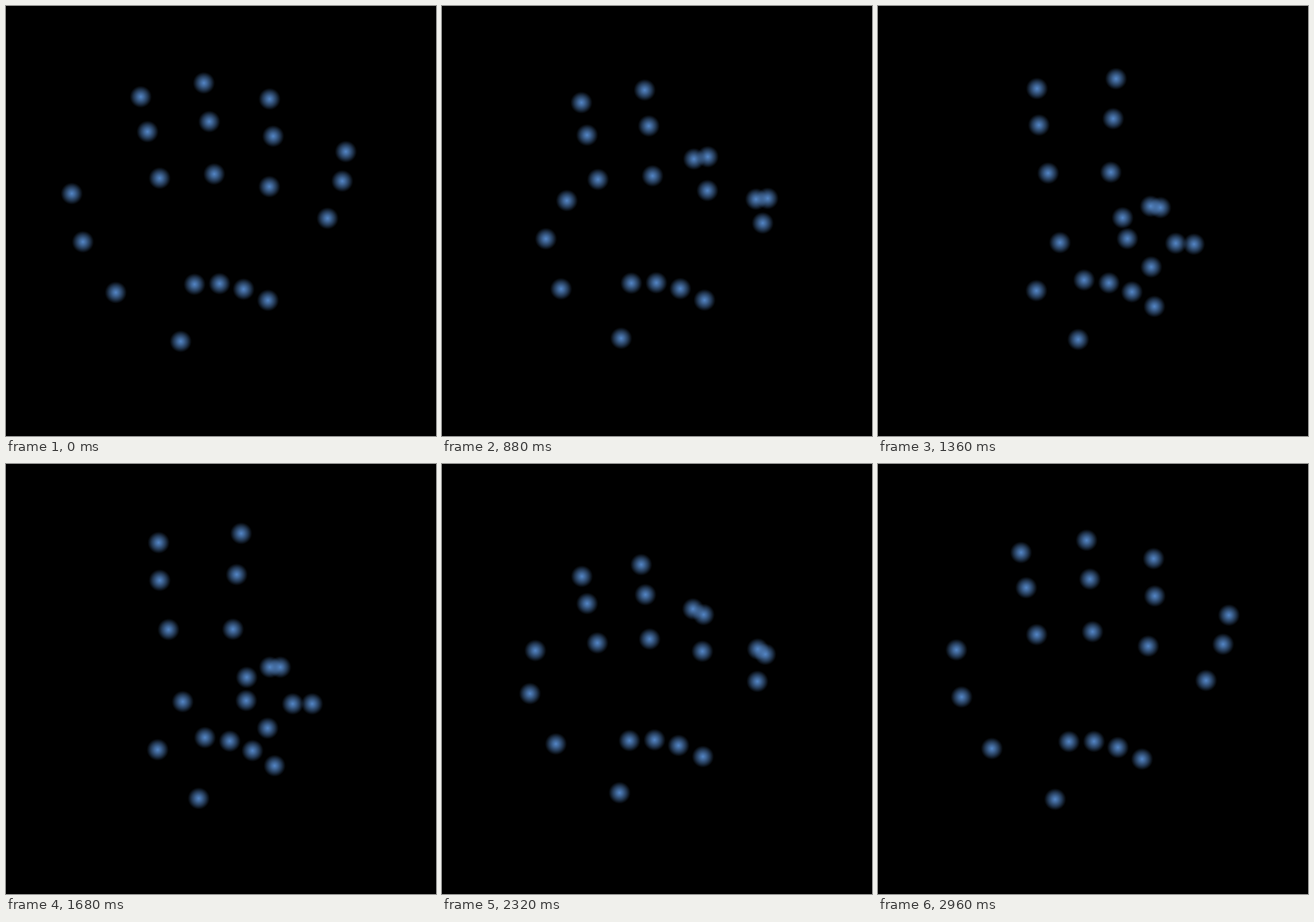
These frames come from a looping animation (618x618 px, 3.04 s). An HTML page with a canvas:

```html
<!DOCTYPE html>
<html lang="en">
<head>
<meta charset="utf-8">
<title>Hand of dots</title>
<style>
  html, body { margin: 0; width: 100%; height: 100%; overflow: hidden; background: #000; }
  canvas { display: block; width: 618px; height: 618px; }
</style>
</head>
<body>
<canvas id="stage" width="618" height="618"></canvas>
<script>
const SIZE = 618, LOOP = 3040, STEP = 80, RADIUS = 16, DEG = Math.PI / 180;
const PALM = { x: 324, y: 407 }, WRIST = { x: 251, y: 482 };
const ctx = document.getElementById('stage').getContext('2d');

// A digit is three bones: the first length, ratios of the next two,
// the first angle from upright and the turn at each joint.
// fold holds the bones of the closed digit; lag sets how its joints follow each other.
const thumb = { length: 116.7, ratio: 0.744, last: 0.82, angle: -53, turn: 20, lag: 1.4,
  fold: [[-59, -70], [36, -69], [92, -35]] };
const fingers = [
  { x: 271, y: 400, length: 160.6, ratio: 0.43, angle: -18.2, turn: 3.6 },
  { x: 307, y: 399, length: 157.7, ratio: 0.48, angle: -2.8, turn: -2.6 },
  { x: 341.5, y: 407, length: 152, ratio: 0.478, angle: 14.1, turn: -9.8,
    fold: [[40, -120], [-15, 0], [-34, 48]] },
  { x: 376.5, y: 423, length: 145.7, ratio: 0.395, angle: 36, turn: -14.5,
    fold: [[54, -89], [-28, 0], [-36, 35]] }
];

const rest = { x: 0, y: 0, spin: 0, lean: 0, reach: 1, grip: 0, curl: 0 };
const two = { x: 13, y: 2, spin: 0.17, lean: 0.035, reach: 1.02, grip: 1, curl: 1 };
const right = { x: 3.3, spin: 0.02, lean: 0.03, grip: 0.02 };

// grip closes the thumb, curl closes ring finger and little finger
const keys = [
  [0, {}],
  [200, { x: -4, y: 3 }],
  [480, { x: -1, y: -1, spin: 0.01, lean: 0.015, reach: 0.99 }],
  [640, { x: 2, spin: 0.015, lean: 0.02 }],
  [1120, { y: -2, spin: 0.01, reach: 0.95, grip: 0.73, curl: 0.72 }],
  [1440, { ...two, x: 28 }],
  [1680, two],
  [2000, { ...two, x: 9, y: 3.4, spin: 0.145, reach: 1.03 }],
  [2320, { x: -1.5, y: -2.5, reach: 0.92, grip: 0.12, curl: 0.14 }],
  [2640, { ...right, x: 1 }],
  [2960, right]
].map(([t, pose]) => ({ ...rest, ...pose, t }));

const slope = (k, name) => (keys[k + 1][name] - keys[k][name]) / (keys[k + 1].t - keys[k].t);

// Tangents that never overshoot a key
function tangent(k, name) {
  if (k === 0) return slope(0, name);
  if (k === keys.length - 1) return slope(k - 1, name);
  const a = slope(k - 1, name), b = slope(k, name);
  return a * b > 0 ? 2 * a * b / (a + b) : 0;
}

function poseAt(t) {
  let k = 0;
  while (k < keys.length - 2 && t >= keys[k + 1].t) k++;
  const from = keys[k], to = keys[k + 1], span = to.t - from.t;
  const u = (t - from.t) / span, v = 1 - u, pose = {};
  for (const name in rest) {
    pose[name] = (1 + 2 * u) * v * v * from[name] + u * v * v * span * tangent(k, name) +
      u * u * (3 - 2 * u) * to[name] - u * u * v * span * tangent(k + 1, name);
  }
  return pose;
}

const glow = ctx.createRadialGradient(0, 0, 0, 0, 0, RADIUS);
[[0, 1], [0.3, 0.75], [0.6, 0.44], [0.9, 0.09], [1, 0]]
  .forEach(([at, alpha]) => glow.addColorStop(at, `rgba(84, 134, 198, ${alpha})`));

function dot(x, y) {
  ctx.setTransform(1, 0, 0, 1, x, y);
  ctx.fillStyle = glow;
  ctx.beginPath();
  ctx.arc(0, 0, RADIUS, 0, Math.PI * 2);
  ctx.fill();
}

function drawDigit(x, y, digit, closed, reach, lean, turn) {
  const { length, ratio, last = 0.74, lag = 2, fold } = digit;
  dot(x, y);
  [1, ratio, ratio * last].forEach((part, i) => {
    const angle = (digit.angle + digit.turn * i) * DEG + lean + turn * i;
    const size = length * part * reach ** (i + 1);
    let dx = size * Math.sin(angle), dy = -size * Math.cos(angle);
    if (fold) {
      const u = Math.max(0, closed) ** (lag ** (1 - i));
      dx += (fold[i][0] - dx) * u;
      dy += (fold[i][1] - dy) * u;
    }
    dot(x += dx, y += dy);
  });
}

function draw(t) {
  ctx.setTransform(1, 0, 0, 1, 0, 0);
  ctx.fillStyle = '#000';
  ctx.fillRect(0, 0, SIZE, SIZE);

  const { x, y, spin, lean, reach, grip, curl } = poseAt(t);
  const slack = 1 - reach;
  drawDigit(WRIST.x + x + 14 * grip + 50 * slack, WRIST.y + y - 5 * grip - 80 * slack,
    thumb, grip, 1, lean, 0);

  const cos = Math.cos(spin), sin = Math.sin(spin);
  fingers.forEach((finger, i) => {
    const px = finger.x - PALM.x, py = finger.y - PALM.y;
    const splay = (i - 0.5) * spin / 2;
    drawDigit(PALM.x + x + px * cos - py * sin, PALM.y + y + px * sin + py * cos,
      finger, curl, reach, lean + splay, spin / 2);
  });
}

const start = performance.now();
function tick() {
  const t = (performance.now() - start) % LOOP;
  draw(Math.floor(t / STEP) * STEP);
  requestAnimationFrame(tick);
}
tick();
</script>
</body>
</html>
```
